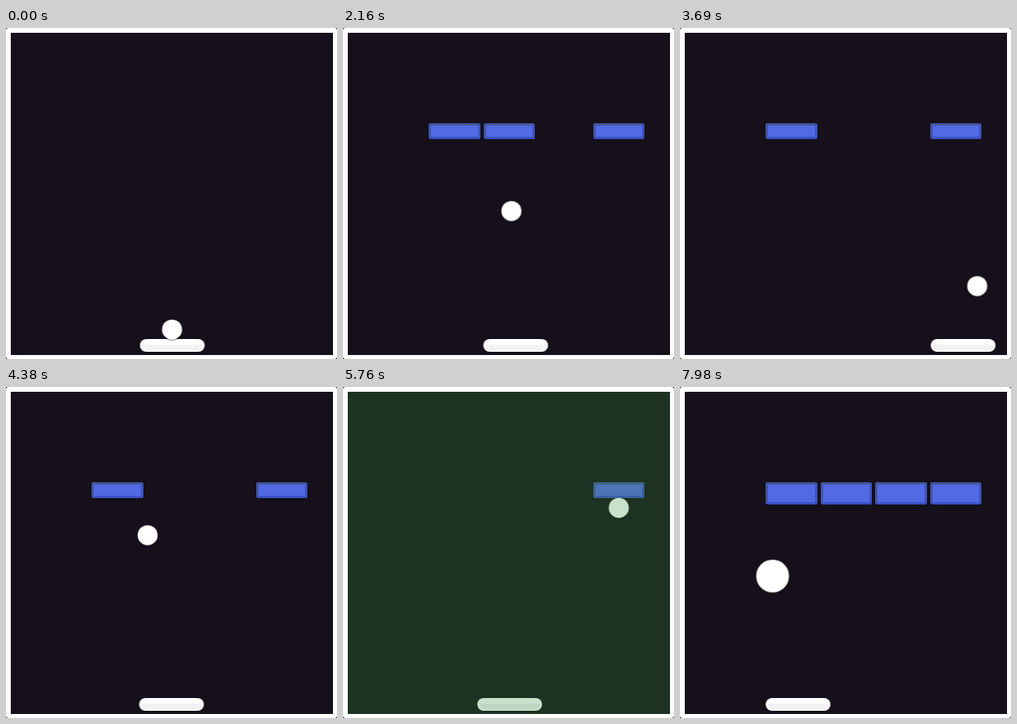
Write an HTML page that moves like this. It is 414 px wide and 414 px high and loops after 8 s.

```html
<!DOCTYPE html>
<html lang="en">
<head>
<meta charset="utf-8">
<title>Brick breaker</title>
<style>
  html, body { margin: 0; width: 100%; height: 100%; overflow: hidden; background: #15111a; }
  .stage { position: relative; width: 414px; height: 414px; background: #fff; border-radius: 3px; overflow: hidden; }
  .stage * { position: absolute; box-sizing: border-box; }
  .field, .flash { left: 6px; top: 6px; width: 403px; height: 403px; background: #15101a; }
  .flash { background: #388e3c; opacity: 0; animation: flash 8s linear infinite; }

  .brick {
    top: 119px; left: calc(38.8px + var(--i) * 68.5px); width: 64.4px; height: 20px;
    background: #526ae3; border: 3px solid; border-radius: 3px;
    border-color: #44549a #3b51c4 #3b51c4 #44549a;
    box-shadow: 0 0 2px rgba(0, 0, 0, .5);
    opacity: 0; animation: 8s step-end infinite;
  }
  .tall { height: 28px; }

  .ball-x, .ball-y, .paddle { left: 0; top: 0; animation: 8s linear infinite; }
  .ball-x { animation-name: ball-x; }
  .ball-y { animation-name: ball-y; }
  .ball {
    width: 24.6px; height: 24.6px; transform: translate(-50%, -50%);
    background: #fff; border-radius: 50%; box-shadow: 0 1px 2px rgba(0, 0, 0, .5);
    animation: grow 8s step-end infinite;
  }
  .paddle {
    top: 389px; left: -40.5px; width: 81px; height: 16px;
    background: #fff; border-radius: 8px; box-shadow: 0 0 2px rgba(0, 0, 0, .5);
    animation-name: paddle;
  }
  .paddle::after {
    content: ""; position: absolute; left: 3px; right: 3px; top: 7px; height: 8px;
    background: #f2f2f2; border-radius: 1px 1px 6px 6px;
  }

  /* Brick life spans: first level, then second */
  @keyframes a0 { .35% { opacity: 1 } 8.455% { opacity: 0 } }
  @keyframes a1 { .35% { opacity: 1 } 55.96% { opacity: 0 } }
  @keyframes a2 { .35% { opacity: 1 } 40.125% { opacity: 0 } }
  @keyframes a3 { .7% { opacity: 1 } 24.29% { opacity: 0 } }
  @keyframes a4 { .7% { opacity: 1 } 79.81% { opacity: 0 } }
  @keyframes b0 { 89.95% { opacity: 1 } 97.349% { opacity: 0 } }
  @keyframes early { 89.95% { opacity: 1 } 100% { opacity: 1 } }
  @keyframes late { 90.3% { opacity: 1 } 100% { opacity: 1 } }

  @keyframes ball-x {
    0%, .5375% { transform: translateX(207.5px) }
    7.176% { transform: translateX(18px) }
    20.465% { transform: translateX(397.3px) }
    33.753% { transform: translateX(18px) }
    47.041% { transform: translateX(397.3px) }
    60.33% { transform: translateX(18px) }
    71.796%, 79.8% { transform: translateX(344.7px) }
    79.81%, 90.3% { transform: translateX(207.5px) }
    96.641% { transform: translateX(26.5px) }
    100% { transform: translateX(122.4px) }
  }
  @keyframes ball-y {
    0%, .5375% { transform: translateY(377px) }
    8.455%, 24.29%, 40.125%, 55.96% { transform: translateY(151px) }
    16.373%, 32.208%, 48.043%, 63.879% { transform: translateY(377px) }
    71.796%, 79.8% { transform: translateY(151px) }
    79.81%, 90.3% { transform: translateY(368.5px) }
    97.349% { transform: translateY(167.3px) }
    100% { transform: translateY(243px) }
  }
  @keyframes grow {
    79.81%, 100% { width: 40.6px; height: 40.6px }
  }

  /* Chases a falling ball, drifts back to the middle while it rises */
  @keyframes paddle {
    0%, 8.455% { transform: translateX(207.5px) }
    11.349% { transform: translateX(137.1px) }
    16.373% { transform: translateX(259.3px) }
    18.503%, 24.29% { transform: translateX(207.5px) }
    25.815% { transform: translateX(244.6px) }
    32.208% { transform: translateX(89.1px) }
    37.076%, 40.125% { transform: translateX(207.5px) }
    40.269% { transform: translateX(205px) }
    46.706%, 48.043% { transform: translateX(368px) }
    54.513%, 55.96% { transform: translateX(206.5px) }
    61.885% { transform: translateX(62.4px) }
    63.879% { transform: translateX(110.9px) }
    67.863%, 79.8% { transform: translateX(208px) }
    79.81%, 97.349% { transform: translateX(207.5px) }
    100% { transform: translateX(141.2px) }
  }
  @keyframes flash {
    0% { opacity: 0 }
    71.796% { opacity: 0; animation-timing-function: cubic-bezier(.2, .4, .5, 1) }
    73.1%, 79.8% { opacity: .85 }
    79.81%, 100% { opacity: 0 }
  }
</style>
</head>
<body>
<div class="stage">
  <div class="field"></div>
  <div class="brick" style="--i:0; animation-name:a0"></div>
  <div class="brick" style="--i:1; animation-name:a1"></div>
  <div class="brick" style="--i:2; animation-name:a2"></div>
  <div class="brick" style="--i:3; animation-name:a3"></div>
  <div class="brick" style="--i:4; animation-name:a4"></div>
  <div class="brick tall" style="--i:0; animation-name:b0"></div>
  <div class="brick tall" style="--i:1; animation-name:early"></div>
  <div class="brick tall" style="--i:2; animation-name:early"></div>
  <div class="brick tall" style="--i:3; animation-name:late"></div>
  <div class="brick tall" style="--i:4; animation-name:late"></div>
  <div class="paddle"></div>
  <div class="ball-x"><div class="ball-y"><div class="ball"></div></div></div>
  <div class="flash"></div>
</div>
</body>
</html>
```
